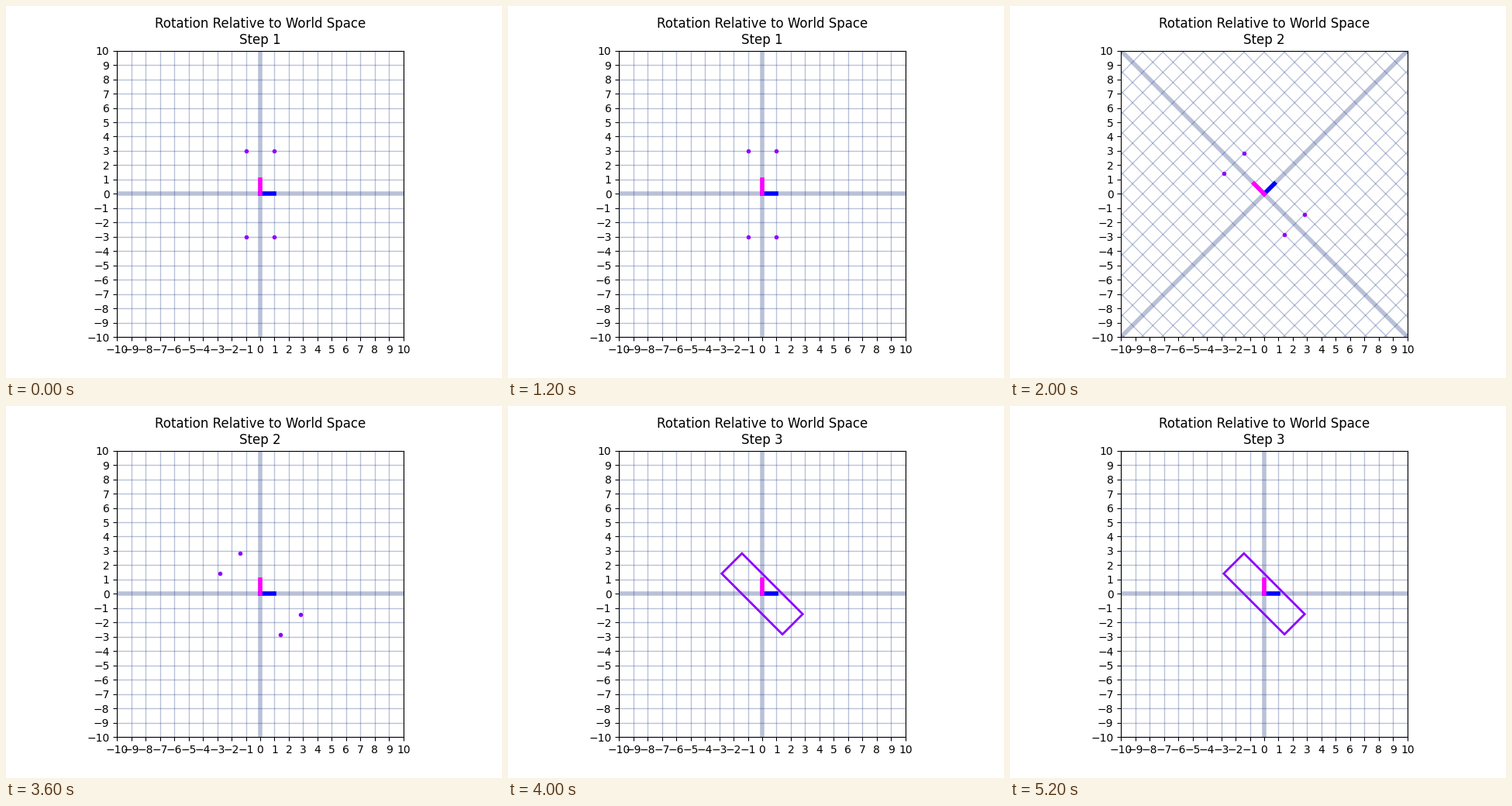
Animation, 640 px wide and 480 px high, one loop 6 s. Source, as a matplotlib script:

```python
import numpy as np
import matplotlib.pyplot as plt
from matplotlib.animation import FuncAnimation

GRID_COLOR = (0.1, 0.2, 0.5, 0.3)
VIOLET = "#8f00ff"
LIMIT = 10
REACH = 20
QUARTER = np.pi / 4

# One entry per second: step number, grid angle, shape angle, outlined
SCHEDULE = [
    (1, 0, 0, False),
    (1, 0, 0, False),
    (2, QUARTER, QUARTER, False),
    (2, 0, QUARTER, False),
    (3, 0, QUARTER, True),
    (3, 0, QUARTER, True),
]

CORNERS = np.array([(1, 3), (-1, 3), (-1, -3), (1, -3)])

fig, ax = plt.subplots(figsize=(6.4, 4.8), dpi=100)


def rotate(points, angle):
    c, s = np.cos(angle), np.sin(angle)
    return np.asarray(points) @ np.array([[c, s], [-s, c]])


def segment(start, end, angle, **style):
    ax.plot(*rotate([start, end], angle).T, **style)


def draw_grid(angle):
    for k in range(-REACH, REACH + 1):
        style = dict(color=GRID_COLOR, linewidth=1 if k else 4)
        segment((k, -REACH), (k, REACH), angle, **style)
        segment((-REACH, k), (REACH, k), angle, **style)


def draw_basis(angle):
    segment((0, 0), (1, 0), angle, color="blue", linewidth=4)
    segment((0, 0), (0, 1), angle, color="magenta", linewidth=4)


def draw_shape(angle, outlined):
    corners = rotate(CORNERS, angle)
    if outlined:
        ax.add_patch(plt.Polygon(corners, fill=False, edgecolor=VIOLET,
                                 linewidth=2, zorder=2))
    else:
        ax.plot(*corners.T, ".", color=VIOLET)


def update(frame):
    step, grid_angle, shape_angle, outlined = SCHEDULE[frame]
    ax.clear()
    draw_grid(grid_angle)
    draw_basis(grid_angle)
    draw_shape(shape_angle, outlined)
    ax.set_aspect("equal")
    ticks = range(-LIMIT, LIMIT + 1)
    ax.set(xlim=(-LIMIT, LIMIT), ylim=(-LIMIT, LIMIT),
           xticks=ticks, yticks=ticks)
    ax.set_title(f"Rotation Relative to World Space\nStep {step}")
    return []


anim = FuncAnimation(fig, update, frames=len(SCHEDULE), interval=1000,
                     init_func=lambda: update(0), repeat=True, repeat_delay=0)
plt.show()
```
